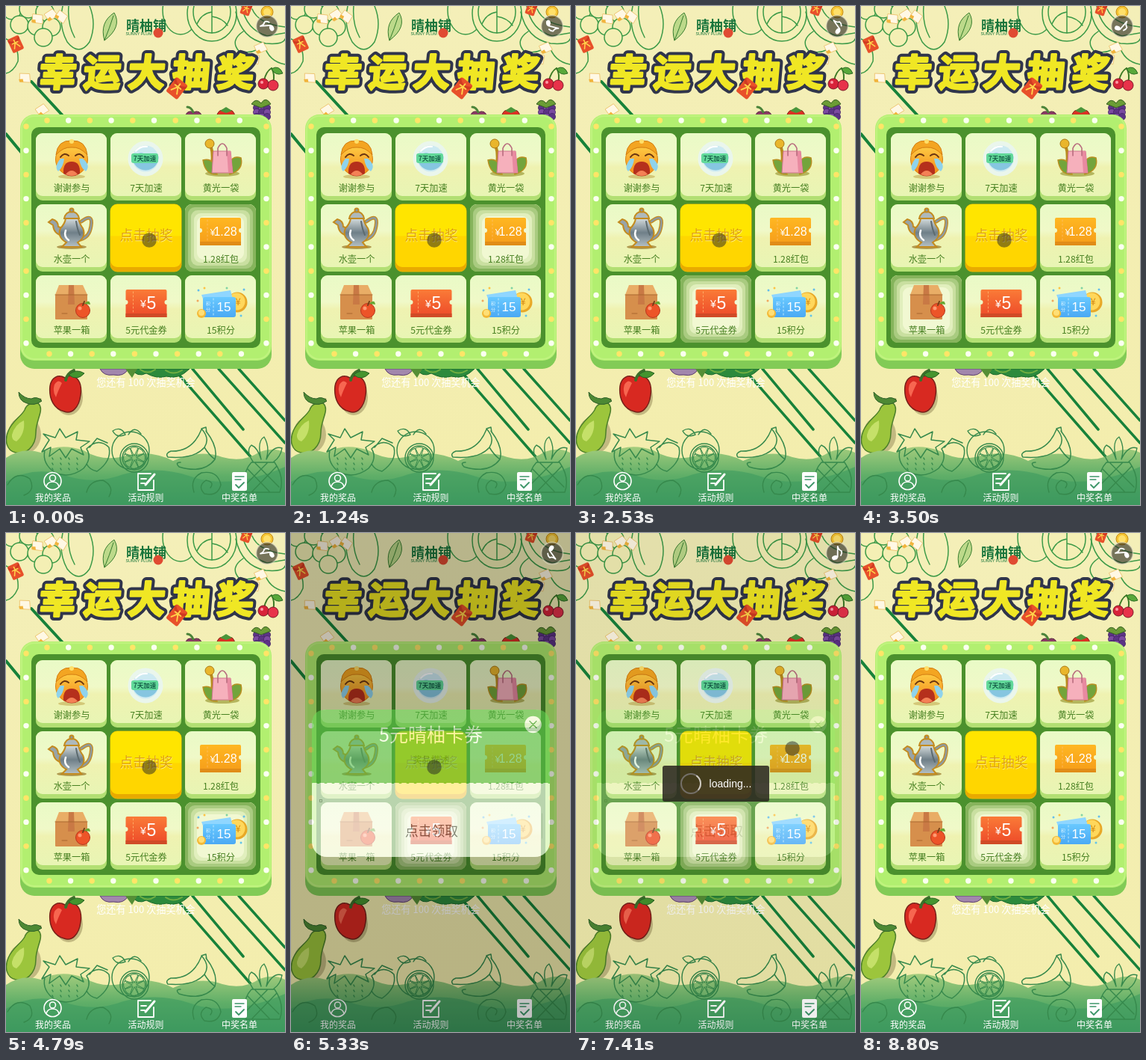
Animation, 374 px wide and 667 px high, one loop 8900 ms. Source, as an HTML page:

```html
<!DOCTYPE html>
<html lang="zh">
<head>
<meta charset="utf-8">
<style>
html,body{margin:0;width:100%;height:100%;overflow:hidden;background:#f3eeb1}
svg{display:block;width:374px;height:667px;font-family:"Noto Sans CJK SC","Noto Sans CJK",sans-serif}
</style>
</head>
<body>
<svg id="stage" viewBox="0 0 374 667" xmlns="http://www.w3.org/2000/svg"></svg>
<script>
const LOOP = 8900;
const LATIN = 'font-family="Liberation Sans,sans-serif"';
const text = (x, y, s, size, fill, more = '') =>
  `<text x="${x}" y="${y}" font-size="${size}" fill="${fill}" text-anchor="middle" ${more}>${s}</text>`;
const rect = (x, y, w, h, r, fill, more = '') =>
  `<rect x="${x}" y="${y}" width="${w}" height="${h}" rx="${r}" fill="${fill}" ${more}/>`;
const circ = (x, y, r, fill, more = '') => `<circle cx="${x}" cy="${y}" r="${r}" fill="${fill}" ${more}/>`;
const oval = (x, y, rx, ry, fill, more = '') => `<ellipse cx="${x}" cy="${y}" rx="${rx}" ry="${ry}" fill="${fill}" ${more}/>`;
const path = (d, fill, more = '') => `<path d="${d}" fill="${fill}" ${more}/>`;
const line = (d, color, w = 1, more = '') =>
  `<path d="${d}" fill="none" stroke="${color}" stroke-width="${w}" stroke-linecap="round" stroke-linejoin="round" ${more}/>`;
const turn = (x, y, a, s) => `<g transform="translate(${x} ${y}) rotate(${a})">${s}</g>`;
const grad = (id, ...cs) => `<linearGradient id="${id}" x2="0" y2="1">` +
  cs.map((c, i) => `<stop offset="${i / (cs.length - 1)}" stop-color="${c}"/>`).join('') + '</linearGradient>';

const packet = (x, y, a, k = 1) => turn(x, y, a, `<g transform="scale(${k})">` +
  rect(-8, -10, 16, 20, 2, '#e8502a') + path('M-8-9Q0 0 8-9V-5Q0 3-8-5Z', '#cf3a22') +
  line('M-4-2H4M0-6V-2L-4 5M0-2L4 5', '#ffd24a', 1.6) + '</g>');
const scrap = (x, y, a) => turn(x, y, a,
  path('M-8-4L5-7L9 4L-5 7Z', '#fff8e4', 'stroke="#ecc06a" stroke-width=".8"') + path('M-7 4L-2 2L0 6L-5 7Z', '#f1b43c'));

function backdrop() {
  const g = '#3c9a48', bar = '#17823a', pen = `stroke="${g}" stroke-width="1.5"`;
  let s = rect(0, 0, 374, 667, 0, 'url(#sky)');
  // outlined fruit along the top
  for (const [x, y] of [[8, 6], [30, 4], [52, 8], [18, 25], [41, 27], [61, 28], [50, 42]]) s += circ(x, y, 12, '#f4efb4', pen);
  s += line('M76 0Q70 26 82 48Q98 68 112 48Q122 24 112 0M84 0Q82 24 92 42M0 44Q18 52 16 74Q10 88 0 90', g, 1.5);
  s += oval(234, 6, 24, 32, 'none', pen) + oval(276, 10, 33, 37, '#f4efb4', pen) + oval(276, 8, 25, 28, 'none', pen) +
    line('M276-10V36M276 8Q262 10 256 24M276 14Q290 16 297 26', g, 1.5) +
    line('M308 8Q316 44 348 50Q372 52 374 44M316 0Q322 32 350 40L374 36M330 4Q338 24 374 28M318 34Q300 46 312 60Q334 66 346 50M346 52Q352 74 374 78', g, 1.5);
  s += line('M0 171L24 200M34 101L82 153', bar, 4);
  s += line('M225 485L338 614M250 485L318 566M285 485L374 584M312 485L374 554', bar, 3.5);
  // leaf and scraps
  s += path('M132 46Q125 22 145 9Q156 28 132 46Z', '#bcd98a', 'stroke="#377c2d"') + line('M132 46Q139 29 144 13', '#377c2d');
  s += scrap(42, 17, 20) + scrap(60, 12, -20) + scrap(74, 14, 50) + scrap(25, 96, 15) + scrap(48, 139, -20) +
    scrap(332, 70, 30) + scrap(341, 56, -10);
  s += packet(13, 51, -25) + packet(322, 4, 20, .8);
  s += circ(350, 8, 8, '#f6c531', 'stroke="#c58a18"') + circ(350, 8, 5, '#ffe06a');
  // cherries and berries
  s += line('M346 100Q348 88 356 83M358 102Q361 92 356 83', '#3c7a25', 2) + path('M356 84Q366 78 371 90Q361 94 356 84Z', '#58a83a', 'stroke="#2c6c25"') +
    circ(345, 104, 7, '#d8233a', 'stroke="#7d1727"') + circ(358, 106, 7, '#e8324a', 'stroke="#7d1727"') + circ(343, 102, 2, '#ff9ba6');
  for (let i = 0; i < 9; i++) s += circ(336 + i % 3 * 7, 136 + (i / 3 | 0) * 6, 4.6, i % 2 ? '#7b4aa0' : '#5c3385', 'stroke="#402161" stroke-width=".7"');
  s += path('M329 131Q335 122 342 130Q348 120 355 131L342 136Z', '#6b9c35', 'stroke="#365f23"');
  s += path('M282 149Q284 136 295 140Q306 136 307 149Z', '#dc3224', 'stroke="#7b211b"') + path('M287 140L295 135L303 140L295 143Z', '#4a963a');
  s += path('M240 149Q242 138 251 142Q261 138 263 149Z', '#8d3c65', 'stroke="#51233d"') + line('M251 142Q248 135 243 135', '#4b843a', 3);
  return s;
}

function veggies() {
  let s = oval(25, 573, 22, 25, '#c2b981') + oval(84, 523, 19, 24, '#c2b981');
  s += path('M32 532C42 526 48 533 46 543C44 552 40 560 40 570C40 590 26 600 13 597C0 594-2 580 3 568C9 554 20 549 25 540Q27 534 32 532Z', '#9cc53c', 'stroke="#4c7f2a" stroke-width="1.5"') +
    path('M8 573Q12 559 24 554Q26 572 14 582Q7 580 8 573Z', '#c5e069') + line('M37 531Q40 526 46 526', '#53672a', 3);
  s += path('M17 516Q25 525 34 525Q42 521 48 528Q38 535 28 531Q17 528 17 516Z', '#4d8934', 'stroke="#2e6029"');
  s += path('M79 497C91 489 103 500 100 520C98 537 88 546 78 542C65 539 57 526 59 508C61 496 70 492 79 497Z', '#d82921', 'stroke="#762019" stroke-width="1.5"') +
    path('M65 506Q70 498 75 504Q69 516 67 523Q62 516 65 506Z', '#f76650') + line('M80 500Q82 491 91 487', '#3d702b', 4) +
    path('M84 493Q94 484 105 491Q95 502 84 493Z', '#45942f', 'stroke="#286323"');
  s += path('M126 485Q131 495 144 493Q158 496 164 485Z', '#a287ad', 'stroke="#5c3d70"') +
    path('M168 485Q176 497 188 491Q203 499 215 495Q231 500 246 485Z', '#2d8a3c', 'stroke="#1b6a2c"') +
    line('M180 486Q190 493 200 486M214 487Q224 494 236 487', '#71ae41', 2) + path('M160 485L169 497L176 485Z', '#558e36');
  return s;
}

function hills() {
  const c = '#36894c', pen = `stroke="${c}" stroke-width="1.4"`;
  let s = path('M0 604Q22 589 47 597Q72 583 104 594Q132 611 164 600Q198 594 224 608Q260 592 290 603Q318 611 340 596Q359 589 374 597V667H0Z', 'url(#hill)');
  s += path('M0 636Q36 614 78 627Q118 641 157 626Q204 614 245 628Q300 648 374 616V667H0Z', '#3f9b60', 'opacity=".6"');
  // berries with jagged leaves
  s += line('M52 594Q48 612 66 624Q86 632 104 618Q116 604 108 592M48 596L58 580L50 572L66 577L72 565L80 577L96 569L94 580L112 582L100 590L104 600L88 592L80 604L72 592L58 602L60 590ZM108 592Q124 576 138 590Q142 608 122 622Q112 620 108 612M112 590L122 578L136 584', c, 1.5);
  for (let i = 0; i < 12; i++) s += line(`M${62 + i % 4 * 11} ${604 + (i / 4 | 0) * 7}l1 2`, c, 1.4);
  s += circ(167, 594, 25, 'none', pen) + circ(172, 604, 19, 'none', pen) + circ(172, 604, 16, 'none', pen);
  for (let a = 0; a < 8; a++) s += turn(172, 604, a * 45, line('M0-3L5-13Q0-16-5-13Z', c));
  s += line('M160 573Q154 561 143 568Q148 578 160 573M164 573Q172 560 181 572', c, 1.4);
  s += line('M262 565Q274 578 266 590Q252 606 217 603Q213 598 221 595Q250 596 262 566M268 568Q285 590 280 606Q265 626 232 616Q226 610 234 610M266 590Q272 600 280 606M262 565L268 563L269 570', c, 1.5);
  s += line('M329 610Q315 625 322 650H367Q374 630 360 610ZM331 609Q321 594 329 587Q337 590 342 606Q336 582 346 576Q354 589 349 606Q358 587 370 591Q368 603 359 609M324 619L353 649M334 611L366 643M363 615L330 649M350 611L321 640', c, 1.4);
  s += line('M252 650Q246 632 262 624Q284 620 288 640Q284 656 266 652Q256 642 268 634Q280 636 274 644M2 640Q14 620 32 632Q40 648 24 654M108 650Q112 634 130 634Q146 642 138 656', c, 1.4);
  return s;
}

const cells = [[0, 0], [1, 0], [2, 0], [2, 1], [2, 2], [1, 2], [0, 2], [0, 1]].map(([c, r]) => [40 + c * 100, 170 + r * 95]);

function board() {
  let s = rect(19, 156, 337, 329, 19, '#82cb56') + rect(19, 145, 337, 329, 19, '#b2ef70') +
    rect(21, 147, 333, 325, 17, 'none', 'stroke="#c0f37f" stroke-width="2"');
  const dot = (x, y, i) => circ(x, y, 3.7, i % 2 ? '#fbfff0' : '#ffe567');
  for (let i = 0; i < 10; i++) {
    s += dot(55 + i * 28.7, 153, i) + dot(58 + i * 28.6, 465, i) + dot(27, 161 + i * 32.2, i) + dot(349, 161 + i * 32.2, i);
  }
  s += rect(34, 162, 307, 295, 10, '#4b912d');
  for (const [x, y] of cells) s += rect(x, y, 95, 90, 9, '#b2df73') + rect(x, y, 95, 84, 9, 'url(#cell)');
  s += rect(140, 265, 95, 90, 9, '#e9aa00', 'stroke="#e9b800"') + rect(140, 265, 95, 84, 9, 'url(#gold)') +
    text(188.5, 314, '点击抽奖', 17.7, '#fff27a') + text(188, 313, '点击抽奖', 17.7, '#dfa011');
  s += '<g id="lit">' + [['#86b45c', 0], ['#a9cb80', 4], ['#c9dfa0', 8], ['#e1efbd', 12], ['#f1f8d2', 16]]
    .map(([c, d]) => rect(d, d, 95 - 2 * d, 90 - 2 * d, 9, c)).join('') + '</g>';
  return s;
}

const ticket = (x, y, id, edge) =>
  path(`M${x + 2} ${y}H${x + 53}Q${x + 55} ${y} ${x + 55} ${y + 2}V${y + 14}a3 3 0 0 0 0 6V${y + 37}H${x}V${y + 20}a3 3 0 0 0 0-6V${y + 2}Q${x} ${y} ${x + 2} ${y}Z`, `url(#${id})`) +
  rect(x, y + 32, 55, 5, 0, edge) + line(`M${x + 10} ${y + 3}V${y + 31}`, '#ffc27a', 1, 'stroke-dasharray="2 3" opacity=".7"');

function prizes() {
  let s = '';
  // crying face
  s += oval(88, 228, 18, 3, '#d3c878') + circ(88, 205, 21.5, 'url(#face)', 'stroke="#d98412"') +
    path('M67 199Q69 179 88 180Q107 179 109 199Q99 188 88 189Q77 188 67 199Z', '#f3a522', 'stroke="#d37d12"') + circ(88, 181, 3, '#ffdf69') +
    line('M73 202Q78 195 84 200M93 200Q99 195 104 202', '#6a3510', 2) +
    path('M77 224Q76 208 88 208Q100 208 99 224Q88 231 77 224Z', '#b5301c') + path('M80 225Q88 215 96 225Q88 229 80 225Z', '#f48156') +
    path('M73 204Q64 215 70 221Q77 215 78 204ZM98 204Q100 217 107 221Q114 213 103 204Z', '#8fd3ec');
  // speed bubble
  s += circ(187, 204, 23.5, '#eaf6ec') + circ(187, 204, 17.5, '#cdeaf2') + path('M169.5 203Q178 193 187 198T204.5 201A17.5 17.5 0 0 1 169.5 203Z', '#86c6e0') +
    line('M174 194Q180 187 189 188', '#fff', 2) + rect(168, 197, 36, 13, 3, '#62d99a') + text(186, 207, '7天加速', 8.5, '#17614a', 'font-weight="700"');
  // bag
  s += oval(290, 224, 23, 4, '#b5b65e') + line('M274 185Q280 204 273 221', '#b98a1f', 4) + circ(273, 184, 6, '#e9b62c', 'stroke="#a97714"') +
    path('M264 206Q279 201 283 225Q267 226 264 206ZM298 217Q301 198 315 203Q319 219 300 225Z', '#73a43b', 'stroke="#b99021" stroke-width="1.5"') +
    path('M278 194H301L304 223H276Z', '#f6b0bc', 'stroke="#cf7890"') + path('M296 194H301L304 223H298Z', '#e88aa0') + line('M284 200V190Q290 178 296 190V200', '#b86c7e', 1.6);
  // kettle
  const gold = 'stroke="#c38b20" stroke-width="2"', grip = 'M101 288Q117 276 114 294Q112 309 100 312';
  s += oval(88, 322, 20, 3, '#b19a50') + line(grip, '#c38b20', 5) + line(grip, '#8f9a9e', 2.5) +
    path('M76 307Q64 305 63 293L57 289L62 285Q70 287 70 295L78 298Z', '#98a4a8', gold) + path('M80 284H97Q99 292 103 297Q108 309 96 316L101 322H75L81 316Q68 309 73 297Q79 291 80 284Z', 'url(#steel)', gold) +
    path('M78 284Q80 275 88 275Q96 275 98 284Z', '#aeb9bc', gold) + circ(88, 273, 2.5, '#8b979b', gold) + line('M80 300Q77 308 84 313', '#fff', 2.5) + line('M94 288Q96 300 99 306', '#5d6b70', 2);
  // carton
  s += path('M71 373H103L109 386H66Z', '#e9ad66') + rect(66, 386, 43, 33, 1, '#d68f4c') + path('M84 373H91L92 399H83Z', '#c97945') + line('M66 386H109M75 411H82', '#a9672f') +
    circ(103, 407, 9.5, '#ed5428', 'stroke="#ba351d"') + line('M103 400L105 395', '#714019', 2) + path('M105 398Q112 391 113 399Z', '#66a934') + circ(99, 404, 2.5, '#ff9a71');
  // tickets
  s += ticket(160.5, 379, 'red', '#d04a26') + text(184, 403, '¥', 14, '#fff', LATIN) + text(195, 405, '5', 23, '#fff', LATIN);
  s += ticket(260, 283, 'orange', '#e08c17') + text(277, 307, '¥', 12, '#fff', LATIN) + text(294, 307, '1.28', 16, '#fff', LATIN);
  s += circ(310, 396, 13.5, '#e8a827') + circ(309, 395, 11.5, '#ffd75b') + text(311, 400, '¥', 13, '#d48b12') +
    path('M262 386L301 380L305 396L268 402Z', '#8fd6ff') + rect(264, 389, 44, 27, 3, 'url(#blue)') + line('M278 391V414', '#bce9ff', 1, 'stroke-dasharray="2 3"') +
    text(271, 400, '积', 6, '#e1f6ff') + text(271, 408, '分', 6, '#e1f6ff') +
    text(292, 408, '15', 17, '#fff', LATIN) + circ(262, 411, 6, '#f3b936') + circ(262, 410, 4, '#ffdf75');
  [[258, 380, '#64bdea'], [266, 377, '#ffc343'], [319, 379, '#64bdea'], [257, 394, '#f1a75d'], [315, 414, '#62c4e9'], [296, 377, '#7fd4a3']]
    .forEach(([x, y, c]) => s += circ(x, y, 1.5, c));
  '谢谢参与,7天加速,黄光一袋,1.28红包,15积分,5元代金券,苹果一箱,水壶一个'.split(',')
    .forEach((name, i) => s += text(cells[i][0] + 48, cells[i][1] + 77.5, name, 12.2, '#467f20', 'font-weight="500"'));
  return s;
}

function header() {
  const title = (w, c) => text(192, 0, '幸运大抽奖', 50, '#f0e724', `font-weight="900" letter-spacing="9.5" stroke="${c}" stroke-width="${w}" stroke-linejoin="round" paint-order="stroke"`);
  return text(188, 33, '晴柚铺', 18, '#18753b', 'font-weight="700"') + text(178, 39, 'SUNNY PLUM', 5.4, '#18753b', LATIN) + circ(204, 36, 6.5, '#e04b32') +
    '<g transform="translate(0 107) skewX(-5)">' + title(11, '#30354b') + title(3, '#f0e724') + '</g>' + packet(229, 110, 38, 1.2);
}

function nav() {
  const w = 'stroke="#fff" stroke-width="1.6"';
  return circ(62.5, 635, 11.5, 'none', w) + circ(62.5, 631, 4, 'none', w) + line('M54 642Q56 636 62.5 636Q69 636 71 642', '#fff', 1.6) +
    line('M194 625H177V647H198V634M181 632H188M181 638H186', '#fff', 1.8) + line('M187 640L199 626', '#fff', 3) +
    rect(303, 623, 20, 25, 2, '#fff') + line('M307 629H319M307 633H315', '#3e976a', 1.3) + line('M308 640L312 644L319 637', '#3e976a', 1.8) +
    text(63, 662, '我的奖品', 12, '#fff') + text(187.5, 662, '活动规则', 12, '#fff') + text(313, 662, '中奖名单', 12, '#fff');
}

function dialog() {
  return '<g id="modal">' + rect(0, 0, 374, 667, 0, '#000', 'opacity=".4"') + rect(28, 236, 319, 197, 20, '#fff') +
    path('M28 335V256Q28 236 48 236H327Q347 236 347 256V335Z', '#52b947') + line('M29 335H346', '#fff', 2, 'stroke-dasharray="5 5"') +
    text(187.5, 279, '5元晴柚卡券', 25, '#fff') + text(187.5, 308, '奖品描述', 12, '#23801c') +
    circ(324.5, 256, 11.3, '#fff') + line('M320 251.5L329 260.5M329 251.5L320 260.5', '#459b40', 1.6) +
    rect(38.5, 356.5, 3, 3, 0, 'none', 'stroke="#999" stroke-width=".8"') + line('M336.5 375V408', '#dedede') +
    text(188.5, 405, '点击领取', 17.7, '#484848') + '</g>';
}

const stage = document.getElementById('stage');
stage.innerHTML = '<defs>' + grad('sky', '#f4efb8', '#f3edac') + grad('hill', '#a3cc7c', '#5fae68', '#3c965e') +
  `<linearGradient id="cell" x2="0" y2="1"><stop offset="0" stop-color="#e9fac6"/><stop offset=".42" stop-color="#f0f9c8"/><stop offset=".54" stop-color="#eff2b1"/><stop offset="1" stop-color="#e8f5b4"/></linearGradient>
  <linearGradient id="gold" x2="0" y2="1"><stop offset=".5" stop-color="#ffe500"/><stop offset=".51" stop-color="#ffd600"/></linearGradient>` +
  grad('face', '#ffd348', '#f38719') + grad('steel', '#d5dcdc', '#6f7f88', '#b5c0c3') + grad('red', '#fa7b37', '#ed4929') +
  grad('orange', '#ffb722', '#f59c19') + grad('blue', '#69c9ff', '#4aa9f4') + '</defs>' +
  backdrop() + header() + veggies() + hills() + board() + prizes() + text(187.5, 508, '您还有 100 次抽奖机会', 13.1, '#fff') + nav() + dialog() +
  '<g id="toast">' + rect(116, 311, 143, 48, 3, '#29251f', 'opacity=".86"') + circ(154, 335, 13, 'none', 'stroke="#746f68" stroke-width="2"') +
  '<g id="spin">' + line('M0-13A13 13 0 0 1 13 0', '#cfcac0', 2) + '</g>' + text(207, 340, 'loading...', 14, '#fff', LATIN) + '</g>' +
  circ(350, 27, 14.5, '#292820', 'fill-opacity=".62" stroke="#eee9d2" stroke-opacity=".5" stroke-width="1.8"') +
  '<g id="note">' + oval(-3, 6, 4, 3, '#fff', 'transform="rotate(-20 -3 6)"') + line('M.7 5V-9Q2-4 6-3Q7 0 5 3', '#fff', 1.8) + '</g>' +
  circ(0, 0, 9.8, '#242424', 'id="touch" fill-opacity=".5"');

const el = id => document.getElementById(id);
const [lit, modal, toast, spin, note, touch] = ['lit', 'modal', 'toast', 'spin', 'note', 'touch'].map(el);

// the wheel speeds up, runs evenly, then slows before its last step
const steps = [];
for (let k = 1, t = 1365, d = 100; k <= 50; k++) {
  steps.push(t);
  if (k < 39) d = Math.max(40, d - 10);
  else d += 20;
  t += d + (k === 49 ? 90 : 0);
}

const ramp = (t, a, b) => Math.min(1, Math.max(0, (t - a) / (b - a)));
const ease = p => p * p * (3 - 2 * p);
const route = [[0, 192, 313], [5520, 192, 313], [6450, 228, 398], [6930, 228, 398], [7410, 290, 288], [7690, 306, 330], [8320, 308, 611], [LOOP, 308, 611]];

function touchAt(t) {
  const i = Math.max(1, route.findIndex(p => p[0] > t));
  const a = route[i - 1], b = route[i], p = ease(ramp(t, a[0], b[0]));
  return [a[1] + (b[1] - a[1]) * p, a[2] + (b[2] - a[2]) * p];
}

function draw(t) {
  const n = (3 + steps.filter(s => s <= t).length) % 8;
  lit.setAttribute('transform', `translate(${cells[n]})`);
  const shown = ramp(t, 5190, 5420) * (1 - ramp(t, 7160, 7460));
  modal.setAttribute('opacity', shown);
  modal.style.display = shown ? '' : 'none';
  toast.style.display = (t >= 240 && t < 1090) || (t >= 7220 && t < 7650) ? '' : 'none';
  spin.setAttribute('transform', `translate(154 335) rotate(${t * .36 - 110})`);
  note.setAttribute('transform', `translate(350 27) rotate(${(t - 7410) * .45})`);
  touch.setAttribute('transform', `translate(${touchAt(t)})`);
  touch.setAttribute('opacity', 1 - ramp(t, 8350, 8600));
}

const start = performance.now();
function frame() {
  draw((performance.now() - start) % LOOP);
  requestAnimationFrame(frame);
}
frame();
</script>
</body>
</html>
```
